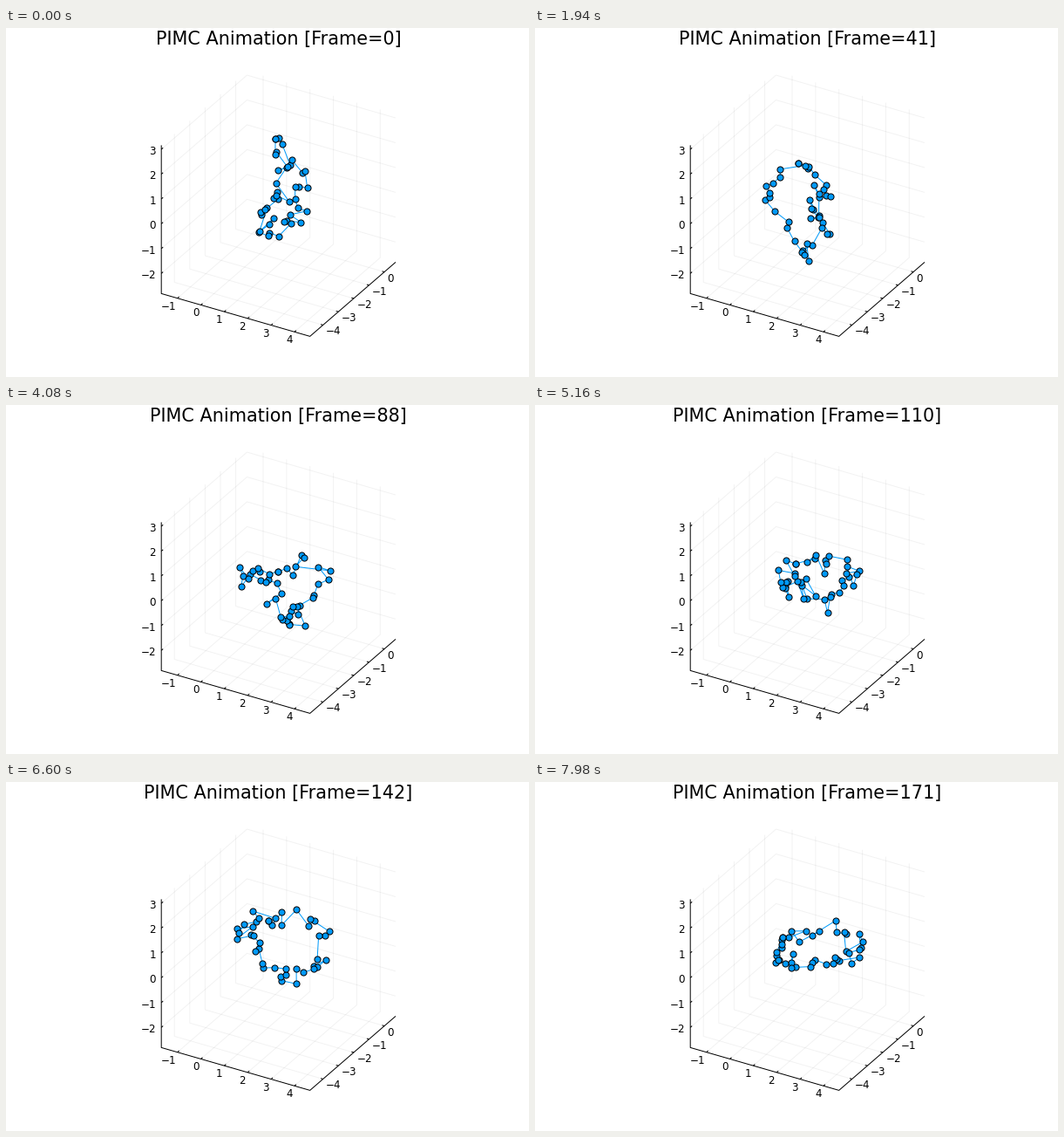
Animation of 600 by 400 pixels, one loop 8 s. Source, as a matplotlib script:

```python
import numpy as np
import matplotlib.pyplot as plt
from matplotlib.animation import FuncAnimation

W, H, DPI = 600, 400, 100
PT = 72 / DPI
BLUE = "#009afa"
BEADS = 40

# Rough outline of the ring, clockwise from the top, at a few steps.
OUTLINES = {
    0: [(309, 125), (346, 176), (343, 220), (300, 238), (292, 207), (320, 190)],
    41: [(305, 157), (340, 188), (316, 205), (334, 240), (308, 260), (258, 192)],
    65: [(292, 156), (332, 174), (335, 226), (325, 228), (293, 200), (240, 176)],
    88: [(315, 186), (368, 190), (338, 235), (321, 255), (308, 204), (266, 195)],
    110: [(304, 178), (345, 180), (366, 198), (332, 225), (305, 206), (278, 214)],
    142: [(300, 156), (350, 162), (365, 214), (320, 230), (287, 195), (272, 172)],
    171: [(282, 178), (333, 178), (380, 188), (350, 208), (310, 212), (276, 211)],
}


def scatter(outline, rng):
    """Beads spread evenly along the outline, each thrown a little off it."""
    pts = np.array(outline, float)
    u = np.arange(BEADS) * len(pts) / BEADS
    ring = [np.interp(u, range(len(pts)), c, period=len(pts)) for c in pts.T]
    return np.stack(ring, axis=1) + rng.normal(0, 7, (BEADS, 2))


def walk(a, b, n, rng):
    """Random accepted moves that lead from pose a to pose b in n steps."""
    moved = (rng.random((n, BEADS, 1)) < 0.5).astype(float)
    moved[rng.integers(n, size=BEADS), np.arange(BEADS)] = 1
    part = moved.cumsum(axis=0)
    part /= part[-1]
    drift = (moved * rng.normal(0, 4, (n, BEADS, 2))).cumsum(axis=0)
    return a + (b - a) * part + drift - drift[-1] * part


def build_path():
    rng = np.random.default_rng(7)
    steps = list(OUTLINES)
    poses = [scatter(o, rng) for o in OUTLINES.values()]
    parts = [poses[0][None]]
    for k in range(1, len(steps)):
        parts.append(walk(poses[k - 1], poses[k], steps[k] - steps[k - 1], rng))
    path = np.concatenate(parts)
    return np.concatenate([path, path[:, :1]], axis=1)


plt.rcParams["font.family"] = "DejaVu Sans"
fig = plt.figure(figsize=(W / DPI, H / DPI), dpi=DPI, facecolor="white")
ax = fig.add_axes([0, 0, 1, 1])
ax.set(xlim=(0, W), ylim=(H, 0))
ax.axis("off")

# Box of the 3D axes: nearest corner of the z axis and three edge vectors.
CORNER = np.array([178.2, 304.4])
EX, EY, EZ = np.array([170.5, 49.0]), np.array([98.3, -85.0]), np.array([0, -170.0])


def line(*pts, alpha=1.0):
    xs, ys = zip(*pts)
    ax.plot(xs, ys, color="black", lw=PT, alpha=alpha, snap=False,
            solid_capstyle="butt")


def grid(*pts):
    line(*pts, alpha=0.05)


def label(value, pos, ha):
    text = str(value).replace("-", "\u2212")
    ax.text(*pos, text, fontsize=11.9 * PT, ha=ha, va="center_baseline")


for v in range(-1, 5):
    p = CORNER + EX * (18.5 + 26.85 * (v + 1)) / 170.5
    grid(p, p + EY, p + EY + EZ)
    line(p, p + EY * 0.02)
    label(v, p + (-6 if v >= 0 else -10, 8), "center")

for v in range(-4, 1):
    p = CORNER + EY * (15 + 17.6 * (v + 4)) / 98.3
    grid(p + EX, p, p + EZ)
    line(p + EX, p + EX * 0.985)
    label(v, p + EX + (3.5, 6), "left")

for v in range(-2, 4):
    p = np.array([CORNER[0], 224.4 - 28.45 * v])
    grid(p, p + EY, p + EY + EX)
    line(p, p + EY * 0.02)
    label(v, p + (-6.2, 0.7), "right")

line(CORNER + EZ, CORNER, CORNER + EX, CORNER + EX + EY)

path = build_path()
title = ax.text(312.5, 18.6, "", fontsize=20.75 * PT, ha="center", va="baseline")
chain, = ax.plot([], [], "-o", color=BLUE, lw=PT, ms=7.1 * PT, mec="black", mew=PT)


def draw(i):
    # Three steps every 140 ms, shown for 20, 100 and 20 ms.
    rounds, tick = divmod(i, 7)
    step = 3 * rounds + (tick >= 1) + (tick >= 6)
    chain.set_data(path[step, :, 0], path[step, :, 1])
    title.set_text(f"PIMC Animation [Frame={step}]")
    return chain, title


anim = FuncAnimation(fig, draw, frames=400, interval=20, repeat=True,
                     cache_frame_data=False)
plt.show()
```
